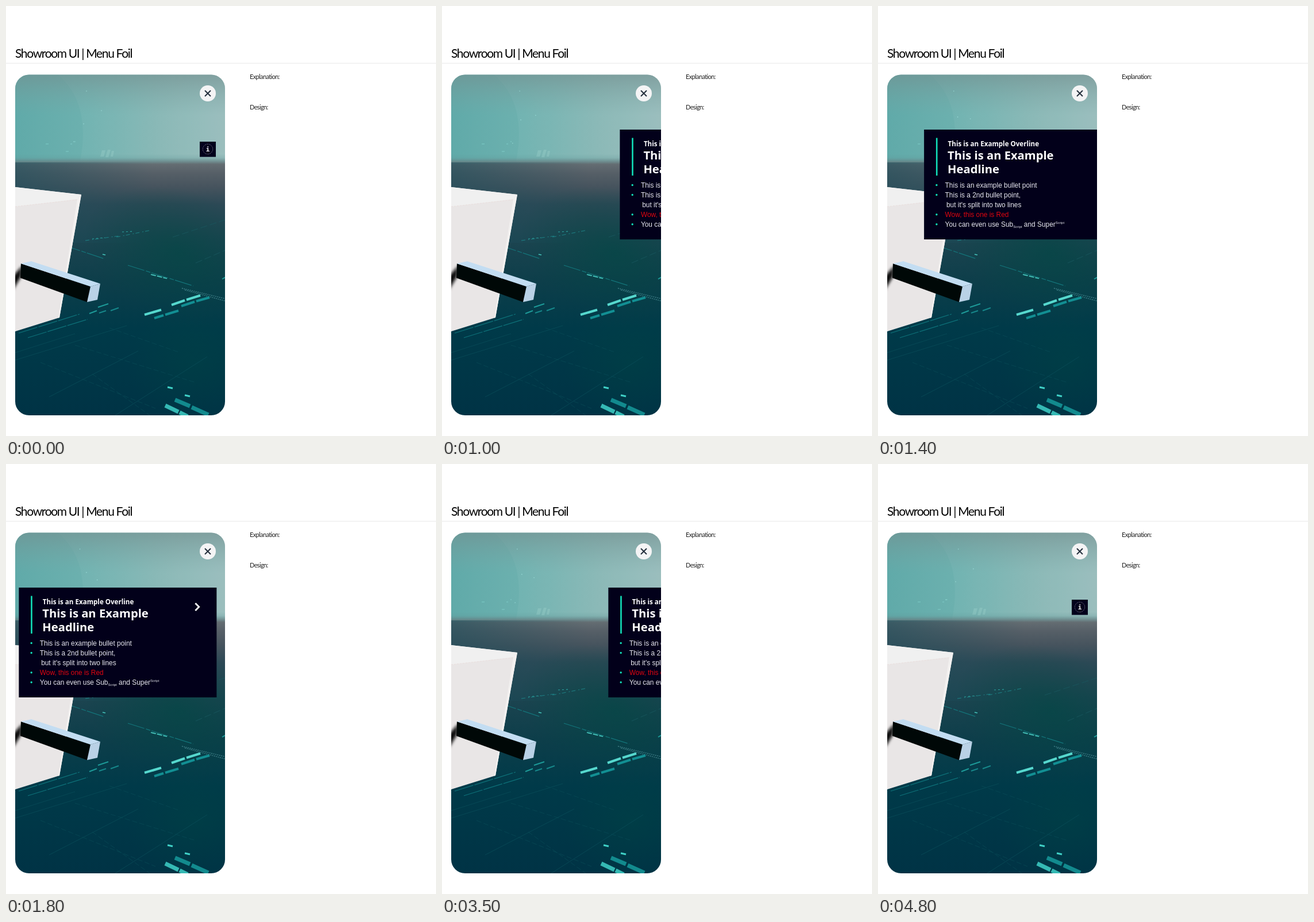
Recreate the animation shown at these times as an HTML page. Size 748x748 px, loop 5000 ms.

```html
<!DOCTYPE html>
<html lang="en">
<head>
<meta charset="utf-8">
<title>Showroom UI</title>
<style>
  html, body { margin: 0; width: 100%; height: 100%; overflow: hidden; background: #fff; }
  svg { display: block; width: 100vw; height: 100vh; }
  .page { font-family: Lato, 'Open Sans', sans-serif; }
  .title { font-size: 21px; letter-spacing: -1.35px; }
  .label { font-size: 11px; letter-spacing: -.63px; fill: #222; }
  .head { font-family: 'Noto Sans', 'Open Sans', sans-serif; font-weight: 700; fill: #fff; }
  .body { font: 11.9px 'Liberation Sans', Arial, sans-serif; fill: #e8e8ee; }
  .tiny { font-size: 6px; }
</style>
</head>
<body>
<svg viewBox="0 0 748 748">
  <defs>
    <clipPath id="card"><rect x="16" y="119.5" width="365" height="592.5" rx="24"/></clipPath>
    <linearGradient id="sky">
      <stop offset="0" stop-color="#60aaa9"/><stop offset=".35" stop-color="#6db1af"/>
      <stop offset=".7" stop-color="#86b6b4"/><stop offset="1" stop-color="#97bcbb"/>
    </linearGradient>
    <linearGradient id="haze" x2="0" y2="1">
      <stop offset="0" stop-color="#738f8f" stop-opacity=".65"/>
      <stop offset=".45" stop-color="#78a3a2" stop-opacity="0"/>
      <stop offset=".88" stop-color="#5f9898" stop-opacity="0"/>
      <stop offset="1" stop-color="#5f8c8e" stop-opacity=".6"/>
    </linearGradient>
    <linearGradient id="ground" gradientUnits="userSpaceOnUse" x1="0" y1="264" x2="0" y2="712">
      <stop offset="0" stop-color="#6b8c8f" stop-opacity="0"/>
      <stop offset=".025" stop-color="#646d72"/><stop offset=".06" stop-color="#565f67"/>
      <stop offset=".11" stop-color="#47545e"/><stop offset=".18" stop-color="#2d4956"/>
      <stop offset=".32" stop-color="#1c4450"/><stop offset=".48" stop-color="#0d3e4a"/>
      <stop offset=".66" stop-color="#003a49"/><stop offset="1" stop-color="#003345"/>
    </linearGradient>
    <linearGradient id="leftTint">
      <stop offset="0" stop-color="#1d4e5b" stop-opacity=".6"/>
      <stop offset="1" stop-color="#1d4e5b" stop-opacity="0"/>
    </linearGradient>
    <radialGradient id="greenTint">
      <stop offset="0" stop-color="#004844" stop-opacity=".6"/>
      <stop offset="1" stop-color="#004844" stop-opacity="0"/>
    </radialGradient>
    <filter id="blur" x="-50%" y="-50%" width="200%" height="200%"><feGaussianBlur stdDeviation="2.5"/></filter>
  </defs>

  <rect width="748" height="748" fill="#fff"/>
  <g class="page">
    <text class="title" x="16" y="89.5">Showroom UI | Menu Foil</text>
    <text class="label" x="424" y="127">Explanation:</text>
    <text class="label" x="424" y="179.5">Design:</text>
  </g>
  <path d="M0 99.5H748" stroke="#e9e9e9"/>

  <g clip-path="url(#card)">
    <rect x="16" y="119" width="365" height="160" fill="url(#sky)"/>
    <g fill="#fff" opacity=".045">
      <path d="M90 119Q150 170 128 275H381V119Z"/>
      <path d="M208 119Q250 185 212 275H381V119Z"/>
      <path d="M262 119Q312 185 268 275H381V119Z"/>
    </g>
    <rect x="16" y="119" width="365" height="157" fill="url(#haze)"/>
    <path d="M164 262l3-11h6l-3 11zM173 263l4-13h5l-4 13zM182 262l2-10h4l-2 10z" fill="#9fd0cb" opacity=".35"/>
    <path d="M69 240h5M112 240h3M119 236h2M104 253h5" stroke="#8fe0da" opacity=".6"/>
    <g id="sparks" fill="#a9ece6"/>

    <rect x="16" y="264" width="365" height="448" fill="url(#ground)"/>
    <rect x="16" y="272" width="240" height="140" fill="url(#leftTint)"/>
    <ellipse cx="300" cy="430" rx="170" ry="110" fill="url(#greenTint)" transform="rotate(17 300 430)"/>
    <ellipse cx="330" cy="620" rx="120" ry="110" fill="url(#greenTint)" opacity=".6"/>
    <g id="floor" fill="none"/>

    <path d="M16 315L131 328L93 542L16 566Z" fill="#e9e6e6"/>
    <path d="M16 315L131 328L125 336L16 349Z" fill="#f0f0f0"/>
    <path d="M131 328L93 542L91 542.6L124 337Z" fill="#f3f1f0"/>
    <path d="M16 349L124 337" stroke="#eadfdd" stroke-dasharray="3 2"/>
    <path d="M12 470L28 452L26 471L12 494Z" fill="#111" filter="url(#blur)"/>
    <path d="M26 448L147 488L141 515L25 473Z" fill="#000807"/>
    <path d="M26 448L44 444L164 483L147 488Z" fill="#c3ddf2"/>
    <path d="M147 488L164 483L159 511L141 515Z" fill="#b9d1e6"/>

    <g id="button">
      <rect x="337" y="236" width="28" height="26.5" fill="#02001c"/>
      <circle cx="351" cy="249" r="8.7" fill="none" stroke="#62626e" stroke-width=".9" stroke-dasharray="3 .9"/>
      <text id="info" x="351" y="253" text-anchor="middle" font-size="11" font-weight="700"
        font-family="'DejaVu Sans Mono', monospace">i</text>
    </g>

    <g id="panel">
      <rect y="215" width="344" height="191" fill="#02001a"/>
      <rect x="20.8" y="229.5" width="2.6" height="65.5" fill="#12dfb8"/>
      <g class="head">
        <text x="41.5" y="244" font-size="11.6">This is an Example Overline</text>
        <text font-size="20.2"><tspan x="41" y="266.5">This is an Example</tspan><tspan x="41" y="291">Headline</tspan></text>
      </g>
      <g class="body">
        <text x="36.5" y="315.5">This is an example bullet point</text>
        <text x="36.5" y="332.5">This is a 2nd bullet point,</text>
        <text x="38.8" y="349.7">but it's split into two lines</text>
        <text x="36.5" y="366.8" fill="#e00510">Wow, this one is Red</text>
        <text x="36.5" y="383.8">You can even use Sub<tspan class="tiny" dy="2">Script</tspan><tspan dy="-2"> and Super</tspan><tspan class="tiny" dy="-5">Script</tspan></text>
      </g>
      <path d="M21.8 311.5h.01M21.8 328.5h.01M21.8 362.8h.01M21.8 379.8h.01" stroke="#12dfb8" stroke-width="3.4" stroke-linecap="round"/>
      <path id="arrow" d="M307 242.3L313.3 248.6L307 254.9" fill="none" stroke-width="2.8"/>
    </g>

    <circle cx="351" cy="152" r="14" fill="#f4f4f5"/>
    <path d="M346 147l10 10m0-10l-10 10" stroke="#27323f" stroke-width="2.1"/>
  </g>
</svg>
<script>
  const LOOP = 5000, STEP = 100, TEAL = '#12dfc0', WHITE = '#fff';
  const PANEL_OPEN = 21, PANEL_FROM = 365, PANEL_GONE = 409;
  const $ = id => document.getElementById(id);

  function add(parent, tag, attrs) {
    const el = document.createElementNS('http://www.w3.org/2000/svg', tag);
    for (const key in attrs) el.setAttribute(key, attrs[key]);
    return parent.appendChild(el);
  }

  // Floor light trails: path, colour, width, dash pattern
  [
    ['M16 616L210 556M16 603L120 570M75 680L230 600M190 712L350 610', '#0b4f5b', .7, ''],
    ['M60 620L260 700M120 590L330 655M180 560L300 602M150 640L250 712', '#094b57', .7, '9 4'],
    ['M22 569L128 536M38 577L142 545', '#0d7078', 1.3, '34 2'],
    ['M100 416L172 440M212 451L326 487', '#13757a', 1.2, '30 3 8 2'],
    ['M138 408L196 400M192 402L252 390', '#1d8286', 1, '7 5 2 3'],
    ['M150 405L172 403M202 393L222 392', '#2a9b99', 1.2, '3 4'],
    ['M252 467L280 474M168 432L173 433', '#45c6bd', 1.7, '9 2'],
    ['M306 491L381 509M311 494L381 513', '#3c7c84', 1.4, '2 1.5'],
    ['M330 447L381 425M290 402L381 372', '#1a5860', .8, '12 5'],
    ['M376 475L381 472M145 535L158 530M160 524L178 518', '#1d9a98', 2, ''],
    ['M162 534L174 530M182 530L196 525', '#16878a', 2, ''],
    ['M241 537L270 528.5M288 520L311 512M314 511L338 503.5', '#56d8ce', 4.2, ''],
    ['M258 543L274 538M277 537L300 530M305 522L328 514.5M331 513.5L354 507', '#128f93', 4.2, ''],
    ['M281 663L290 665M311 677L320 679', '#3fd0c6', 3, ''],
    ['M277 695L300 706M302 707L316 714', '#35b9b4', 7, ''],
    ['M294 685L320 696M323 698L352 711', '#128a8e', 7, ''],
  ].forEach(([d, stroke, width, dash]) =>
    add($('floor'), 'path', { d, stroke, 'stroke-width': width, 'stroke-dasharray': dash }));

  // Faint drifting specks: x, y, drift in x and y over one loop
  const sparks = [[140, 148, -14, 0], [166, 182, -9, 24], [118, 236, 14, 8], [135, 205, 6, -20]]
    .map(([x, y, dx, dy]) => ({ x, y, dx, dy, el: add($('sparks'), 'circle', { r: .8, opacity: .7 }) }));

  function bezier(x1, y1, x2, y2, x) {
    if (x <= 0) return 0;
    if (x >= 1) return 1;
    const curve = (a, b, s) => 3 * (1 - s) ** 2 * s * a + 3 * (1 - s) * s * s * b + s ** 3;
    let low = 0, high = 1;
    for (let i = 0; i < 24; i++) {
      const mid = (low + high) / 2;
      if (curve(x1, x2, mid) < x) low = mid; else high = mid;
    }
    return curve(y1, y2, low);
  }

  function panelLeft(t) {
    if (t < 3100)
      return PANEL_FROM + (PANEL_OPEN - PANEL_FROM) * bezier(.25, .1, .25, 1, (t - 858) / 1028);
    return PANEL_OPEN + (PANEL_GONE - PANEL_OPEN) * bezier(.42, 0, 1, 1, (t - 3100) / 500);
  }

  const show = (el, visible) => el.setAttribute('visibility', visible ? 'visible' : 'hidden');

  function render(t) {
    show($('panel'), t > 858 && t < 3600);
    $('panel').setAttribute('transform', `translate(${panelLeft(t).toFixed(2)})`);
    $('arrow').setAttribute('stroke', t >= 3100 ? TEAL : WHITE);
    show($('button'), t < 800 || t >= 3700);
    $('info').setAttribute('fill', t >= 200 && t < 800 ? TEAL : WHITE);
    for (const s of sparks) {
      const swing = (1 - Math.cos(t / LOOP * 2 * Math.PI)) / 2;
      s.el.setAttribute('cx', s.x + s.dx * swing);
      s.el.setAttribute('cy', s.y + s.dy * swing);
    }
  }

  const start = performance.now();
  function frame() {
    const t = (performance.now() - start) % LOOP;
    render(Math.floor(t / STEP) * STEP);
    requestAnimationFrame(frame);
  }
  frame();
</script>
</body>
</html>
```
